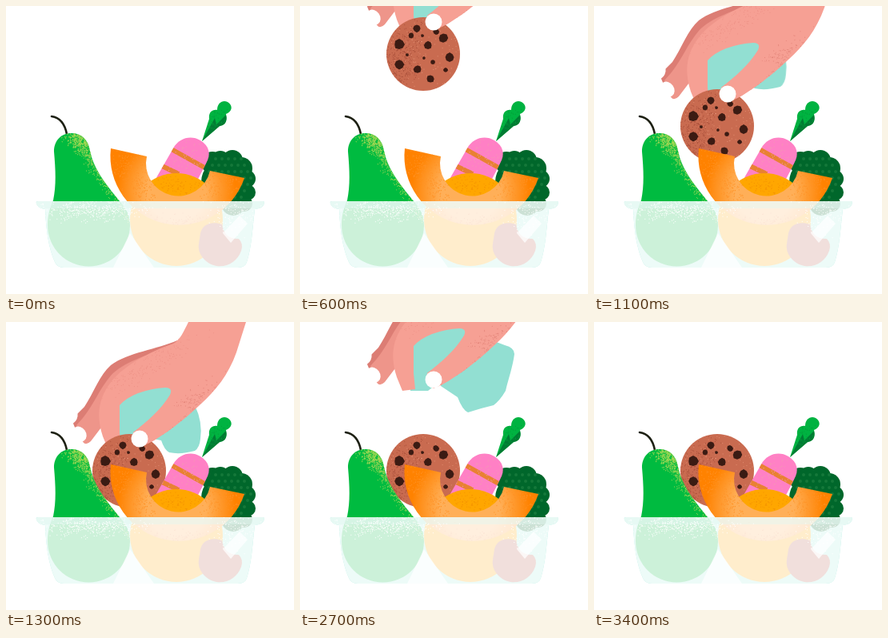
An HTML page that plays this animation: 360 by 360 pixels, repeating every 6400 ms.

```html
<!DOCTYPE html>
<html lang="en">
<head>
<meta charset="utf-8">
<title>Lunch box</title>
<style>
  html, body { margin: 0; width: 100%; height: 100%; overflow: hidden; background: #fff; }
  svg { display: block; width: 360px; height: 360px; }
  .hand, .cookie, .spread, .peek, .marks { animation: 6400ms -8ms infinite; }
  .cookie { animation-name: drop; }
  .hand { animation-name: reach; }
  .peek { animation-name: peek; }
  .spread { animation-name: spread; animation-timing-function: step-end; }
  .marks { animation-name: marks; animation-timing-function: step-end; }
  @keyframes drop {
    0% { transform: translateY(-234px); animation-timing-function: steps(13); }
    20.3125%, 100% { transform: none; }
  }
  @keyframes reach {
    0% { transform: translateY(-234px); animation-timing-function: steps(13); }
    20.3125% { transform: translateY(0); animation-timing-function: step-end; }
    37.5% { transform: translateY(-17px); visibility: visible; animation-timing-function: steps(6); }
    46.874% { transform: translateY(-131px); visibility: visible; animation-timing-function: step-end; }
    46.875%, 100% { transform: translateY(-260px); visibility: hidden; }
  }
  @keyframes peek {
    0%, 12.5% { transform: translate(-8px, -60px); animation-timing-function: steps(5); }
    20.3125%, 100% { transform: none; }
  }
  @keyframes spread {
    0% { visibility: hidden; }
    37.5% { visibility: inherit; }
    46.875%, 100% { visibility: hidden; }
  }
  @keyframes marks {
    0% { visibility: hidden; }
    46.875% { visibility: visible; }
    48.4375%, 100% { visibility: hidden; }
  }
</style>
</head>
<body>
<svg viewBox="0 0 360 360">
  <defs>
    <radialGradient id="glow" gradientUnits="userSpaceOnUse" cx="213" cy="232" r="74">
      <stop offset=".5" stop-color="#ffaf58"/>
      <stop offset="1" stop-color="#ff8200"/>
    </radialGradient>
    <path id="pear" d="M82 159C68 159 60 169 60 182C62 205 63 224 59 243C54 254 52 263 52 274A51.5 51.5 0 0 0 155 274C155 257 146 249 138 239C122 219 109 202 105 181C103 167 94 159 82 159Z"/>
    <path id="melon" d="M131 178A86 86 0 0 0 298 215L255 206A40 40 0 0 1 176 188Z"/>
    <circle id="orange" cx="213" cy="267" r="58"/>
    <path id="carrot" d="M209 178C216 165 231 161 243 168C254 175 257 185 250 197L232 232H184C184 222 187 216 190 211Z"/>
    <path id="leaf" d="M245 169L254 141C253 134 257 129 264 130C264 121 271 117 277 120C284 124 283 132 275 135C277 144 274 149 267 150Z"/>
    <g id="broccoli">
      <circle cx="258" cy="196" r="14"/><circle cx="283" cy="193" r="13"/><circle cx="268" cy="192" r="11"/>
      <circle cx="294" cy="203" r="14"/><circle cx="301" cy="216" r="11"/><circle cx="302" cy="233" r="10"/>
      <circle cx="284" cy="247" r="15"/><circle cx="298" cy="247" r="10"/><circle cx="274" cy="220" r="30"/>
    </g>
    <circle id="disc" cx="154" cy="186" r="46"/>
    <path id="palm" d="M228 -60V0C222 12 218 22 209 27C180 37 148 54 132 74C116 94 112 116 121 143L128 160L144 158L142 138V104Q150 95 165 89Q182 83 199 82Q209 82 205 91C195 108 176 125 159 138Q156 153 167 157C182 152 216 129 243 103C262 86 278 66 288 38L300 0V-60Z"/>
    <path id="tub" d="M40 244H321Q324 244 322 249Q320 253 311 254C308 279 307 302 301 320Q299 327 290 327H72Q64 327 61 320C53 302 50 279 49 254Q41 253 39 249Q36 244 40 244Z"/>
    <clipPath id="in-pear"><use href="#pear"/></clipPath>
    <clipPath id="in-melon"><use href="#melon"/></clipPath>
    <clipPath id="in-orange"><use href="#orange"/></clipPath>
    <clipPath id="in-carrot"><use href="#carrot"/></clipPath>
    <clipPath id="in-leaf"><use href="#leaf"/></clipPath>
    <clipPath id="in-disc"><use href="#disc"/></clipPath>
    <clipPath id="in-palm"><use href="#palm"/></clipPath>
    <clipPath id="in-tub"><use href="#tub"/></clipPath>
  </defs>

  <use href="#tub" fill="#a4eadc"/>

  <g class="hand">
    <g fill="#92dfd2">
      <path d="M138 96L165 84L208 76L212 100L178 146L160 160H138Z"/>
      <path class="peek" d="M190 135L236 104Q246 125 243 146Q242 157 236 161Q218 166 204 163Q198 160 194 148L184 146Z"/>
      <path class="spread" d="M176 140L235 95L256 103Q268 106 268 114C266 130 261 143 257 160Q250 172 242 178Q225 182 210 187Q203 184 197 168L176 154Z"/>
    </g>
    <path fill="#dc7d74" d="M214 23C190 34 152 38 131 54C117 66 110 88 98 106L82 122L87 134L97 125L110 113L145 72L212 38Z"/>
    <path fill="#ee958a" d="M205 32C175 41 146 51 131 67C117 83 110 103 96 120L88 129L95 148Q99 156 106 149L122 128L140 88Z"/>
    <g fill="#fff">
      <ellipse cx="83" cy="119" rx="6" ry="9" transform="rotate(25 83 119)"/>
      <ellipse cx="92" cy="140" rx="8" ry="10" transform="rotate(-35 92 140)"/>
    </g>
  </g>
  <g class="hand">
    <use href="#palm" fill="#f6a094"/>
    <g id="palm-grain" clip-path="url(#in-palm)"/>
  </g>

  <g class="cookie">
    <use href="#disc" fill="#c96b50"/>
    <g id="disc-grain" clip-path="url(#in-disc)"/>
    <g id="chips" fill="#3b1b13" transform="translate(154 186)"/>
  </g>

  <g class="hand">
    <path fill="#f6a094" d="M159 138L203 104L232 108C212 130 188 148 173 154Q160 158 159 138Z"/>
    <circle cx="167" cy="146" r="10.5" fill="#fff"/>
  </g>

  <g class="marks">
    <path d="M94 21q-5 6 -2 13M99 20q0 7 -5 14M126 46l4 7M164 26q5 -2 9 5" fill="none" stroke="#ececee"/>
    <path d="M133 46l5 6l-2 7l-4 0z" fill="#f58a9b"/>
  </g>

  <use href="#leaf" fill="#00b341"/>
  <g clip-path="url(#in-leaf)">
    <path d="M245 169L261 140L263 148L275 136L280 150Z" fill="#007c33"/>
    <g id="leaf-grain"/>
  </g>

  <use href="#broccoli" fill="#00672b"/>
  <g id="florets" fill="#14783a"/>

  <use href="#carrot" fill="#ff80c5"/>
  <g clip-path="url(#in-carrot)">
    <path d="M205 178L250 203M195 200L216 210" stroke="#e98132" stroke-width="6"/>
    <g id="carrot-grain"/>
  </g>

  <use href="#orange" fill="#ffa600"/>
  <g id="orange-grain" clip-path="url(#in-orange)"/>
  <use href="#melon" fill="url(#glow)"/>
  <g id="melon-grain" clip-path="url(#in-melon)"/>

  <path d="M57 138Q72 140 76 160" fill="none" stroke="#1d2013" stroke-width="2.6" stroke-linecap="round"/>
  <use href="#pear" fill="#00bb40"/>
  <g id="pear-grain" clip-path="url(#in-pear)"/>

  <path fill="#b8604f" d="M243 284C246 272 258 269 270 273C272 284 277 291 291 291Q297 297 294 306C289 320 276 327 263 325C249 322 239 310 241 297Z"/>
  <use href="#tub" fill="#fff" fill-opacity=".8"/>
  <g clip-path="url(#in-tub)">
    <path d="M38 244H323V253H38Z" fill="#dff5f0" fill-opacity=".45"/>
    <path d="M271 284L292 262L302 272L281 296ZM155 284L185 327H134Z" fill="#fff" fill-opacity=".75"/>
    <g id="tub-grain"/>
  </g>
</svg>
<script>
  const NS = 'http://www.w3.org/2000/svg';
  const byId = id => document.getElementById(id);
  let seed = 7;
  const rnd = () => (seed = seed * 16807 % 2147483647) / 2147483647;
  const bell = () => (rnd() + rnd() + rnd() - 1.5) * 1.4;

  function add(parent, tag, attrs) {
    const el = document.createElementNS(NS, tag);
    for (const k in attrs) el.setAttribute(k, attrs[k]);
    byId(parent).appendChild(el);
  }

  // Stipple: specks gathered round a centre, optionally turned by deg
  function grain(id, color, n, cx, cy, sx, sy, deg = 0) {
    let d = '';
    for (let i = 0; i < n; i++)
      d += `M${(bell() * sx).toFixed(1)} ${(bell() * sy).toFixed(1)}h1`;
    add(id, 'path', { d, stroke: color, transform: `translate(${cx} ${cy}) rotate(${deg})` });
  }

  grain('pear-grain', '#a6d852', 700, 95, 165, 17, 11, 35);
  grain('pear-grain', '#94d453', 700, 121, 212, 50, 7, 55);
  grain('melon-grain', '#ff9225', 300, 158, 212, 15, 32, -25);
  grain('melon-grain', '#ff9225', 200, 270, 222, 22, 16, -45);
  grain('melon-grain', '#f07a30', 180, 215, 272, 50, 8);
  grain('orange-grain', '#f39200', 120, 213, 226, 32, 9);
  grain('carrot-grain', '#f29ab0', 110, 222, 190, 22, 18);
  grain('leaf-grain', '#00a03a', 70, 262, 142, 9, 14, 30);
  grain('disc-grain', '#a94f3a', 420, 124, 196, 15, 36, 15);
  grain('disc-grain', '#e08d71', 150, 160, 180, 42, 42);
  grain('palm-grain', '#e38479', 300, 214, 118, 46, 9, -40);
  grain('palm-grain', '#ee9287', 200, 180, 55, 50, 9, -28);
  grain('tub-grain', '#fff', 420, 105, 255, 48, 9);
  grain('tub-grain', '#fff', 120, 285, 262, 22, 18);

  const chips = [
    [-8, -32, 5], [16, -28, 4], [-15, -23, 3.5], [25, -20, 6], [6, -11, 5],
    [-30, -12, 6.5], [-30, 13, 6], [-7, 19, 5], [33, 4, 6], [12, 10, 3],
    [9, 31, 5], [28, 20, 3], [1, 5, 2], [-20, 1, 2], [-1, -23, 2]
  ];
  for (const [x, y, r] of chips) {
    let points = '';
    for (let a = 0; a < 6.2; a += Math.PI / 4) {
      const q = r * (0.88 + rnd() * 0.2);
      points += `${(x + q * Math.cos(a)).toFixed(1)},${(y + q * Math.sin(a)).toFixed(1)} `;
    }
    add('chips', 'polygon', { points });
  }

  for (let row = 0; row < 7; row++)
    for (let col = 0; col < 7; col++) {
      const cx = 254 + col * 8 + row % 2 * 4, cy = 191 + row * 8;
      if (Math.hypot(cx - 278, cy - 217) < 31) add('florets', 'circle', { cx, cy, r: 2 });
    }
</script>
</body>
</html>
```
